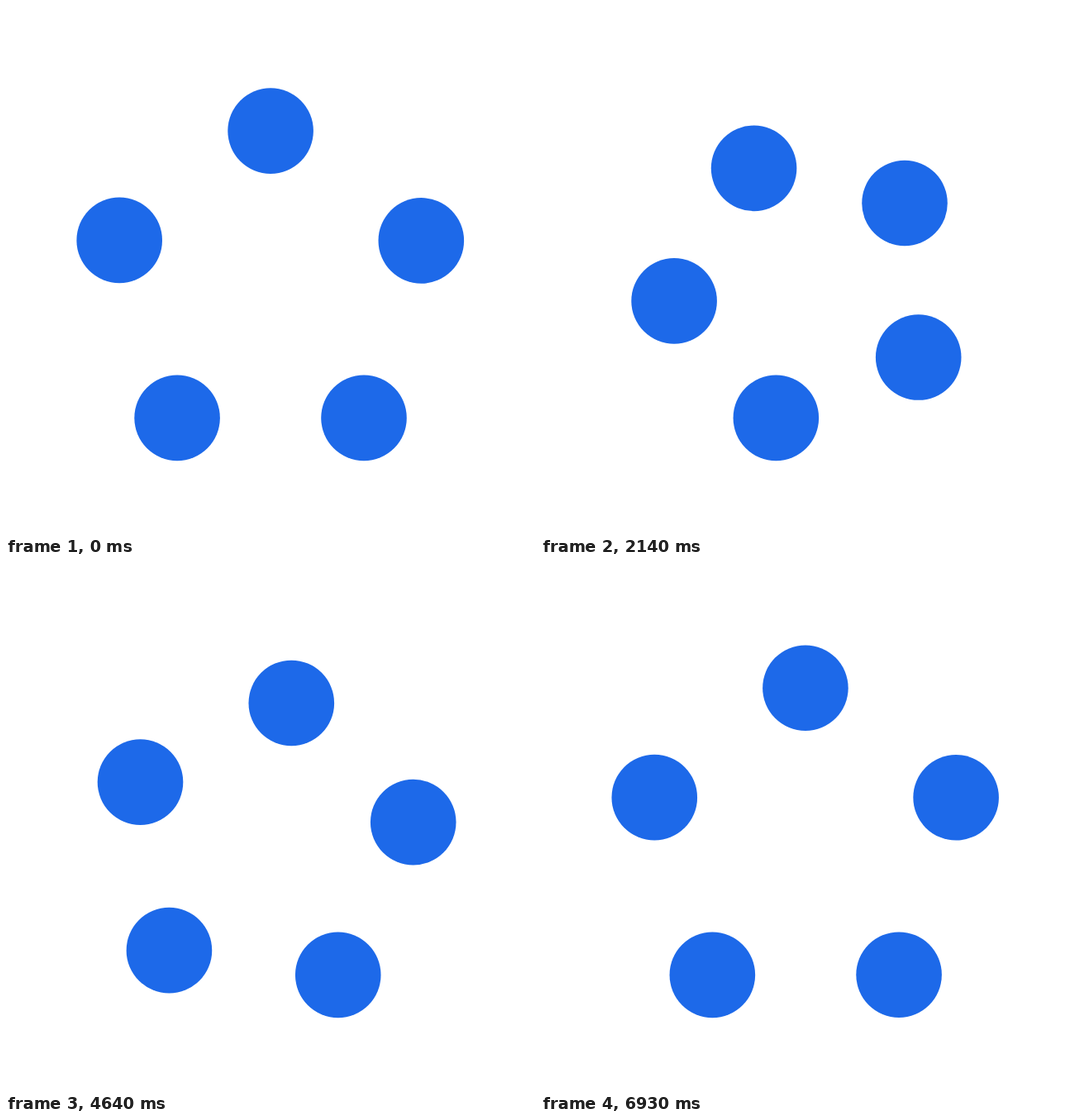
These frames come from a looping animation (640x640 px, 7000 ms). An HTML page:

```html
<!DOCTYPE html>
<html>
<head>
<meta charset="utf-8">
<title>Five circling dots</title>
<style>
  html, body { margin: 0; width: 100%; height: 100%; overflow: hidden; background: #fff; }
  svg { display: block; width: 100vw; height: 100vh; }
</style>
</head>
<body>
<svg viewBox="0 0 640 640" fill="#1d69e9"></svg>
<script>
const LOOP = 7000, MOVE = 1340;
const starts = [0, 1396, 2795, 4200, 5640];
const corners = [[320.1, 151.1], [502.3, 283.9], [433, 498.4], [207.1, 498.4], [137.2, 283.4]];

const svg = document.querySelector('svg');
const dots = corners.map(() => {
  const dot = document.createElementNS('http://www.w3.org/2000/svg', 'circle');
  dot.setAttribute('r', 51.8);
  return svg.appendChild(dot);
});

// cubic-bezier(2/3, 0, 1/3, 1), solved by bisection
function ease(x) {
  if (x <= 0) return 0;
  if (x >= 1) return 1;
  let lo = 0, hi = 1, s;
  for (let i = 0; i < 24; i++) {
    s = (lo + hi) / 2;
    const bx = 2 * (1 - s) ** 2 * s + (1 - s) * s * s + s ** 3;
    if (bx < x) lo = s; else hi = s;
  }
  return s * s * (3 - 2 * s);
}

function draw() {
  const t = performance.now() % LOOP;
  const step = starts.filter(s => s <= t).length - 1;
  const u = ease((t - starts[step]) / MOVE);
  dots.forEach((dot, i) => {
    const a = corners[(i + step) % 5], b = corners[(i + step + 1) % 5];
    dot.setAttribute('cx', a[0] + (b[0] - a[0]) * u);
    dot.setAttribute('cy', a[1] + (b[1] - a[1]) * u);
  });
  requestAnimationFrame(draw);
}
draw();
</script>
</body>
</html>
```
